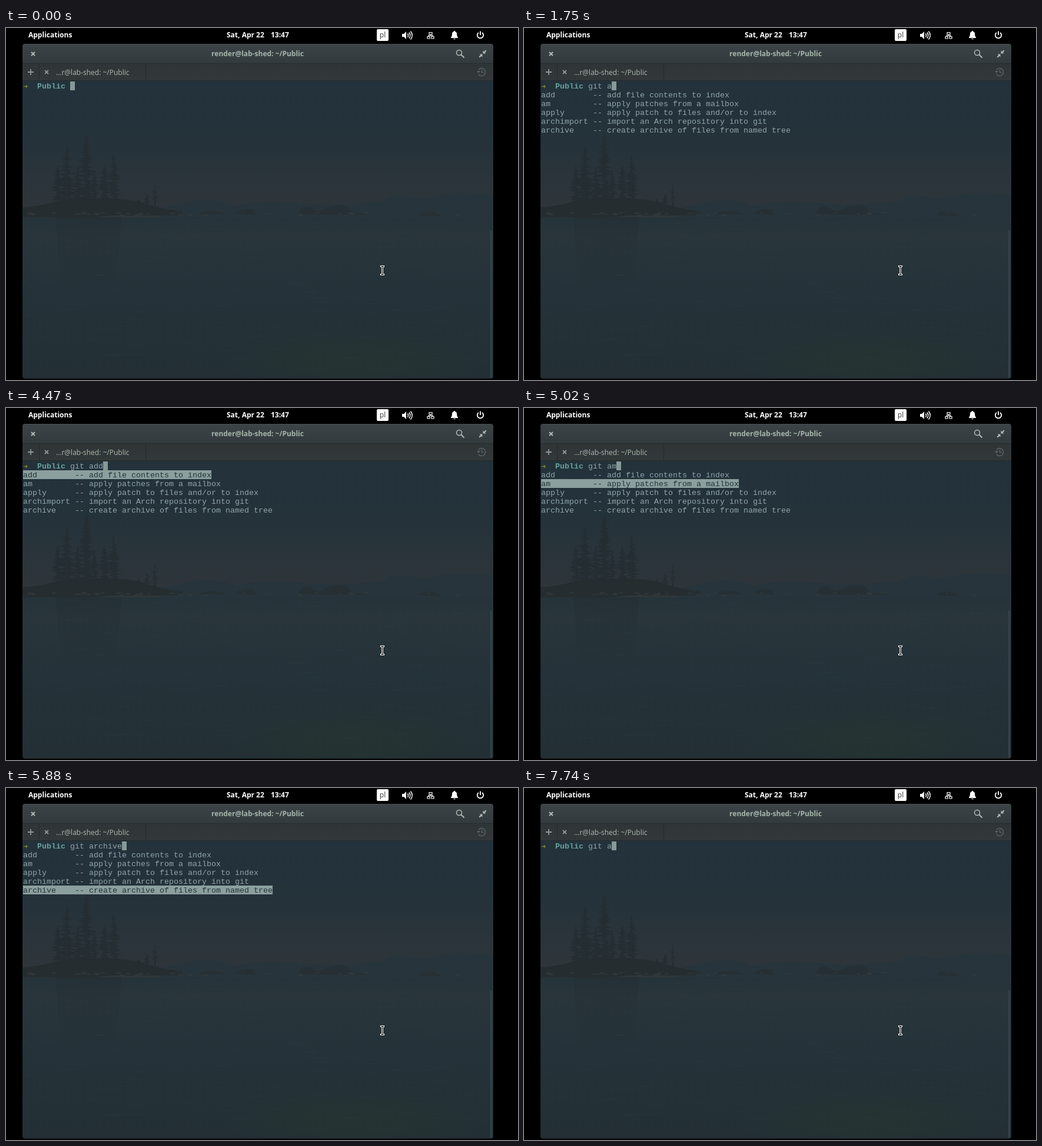
Write an HTML page that moves like this. It is 870 px wide and 599 px high and loops after 8 s.

```html
<!DOCTYPE html>
<html lang="en">
<head>
<meta charset="utf-8">
<title>Terminal completion</title>
<style>
  html, body { margin: 0; width: 100%; height: 100%; overflow: hidden; background: #000; }
  svg { position: absolute; left: 0; top: 0; }
  svg text { font: 12px "Open Sans", "Noto Sans", sans-serif; }
  svg .bold { font-weight: 700; }
  #term { position: absolute; left: 29px; top: 91px; color: #8fa5a9;
    font: 13.333px/17px "Liberation Mono", monospace; white-space: pre; }
  #term div { height: 15px; width: max-content; }
  #prompt { display: flex; }
  #arrow { width: 24px; color: #85862f; font-family: "DejaVu Sans Mono", monospace; }
  #dir { color: #68a29c; font-weight: 700; }
  #cursor { width: 8px; background: #869a98; }
  #term .selected { background: #8b9f9e; color: #24333a; }
</style>
</head>
<body>
<svg width="870" height="599" viewBox="0 0 870 599">
  <defs>
    <linearGradient id="header" x2="0" y2="1">
      <stop stop-color="#3d4448"/><stop offset="1" stop-color="#333a3d"/>
    </linearGradient>
    <linearGradient id="tabs" x2="0" y2="1">
      <stop stop-color="#2f3537"/><stop offset="1" stop-color="#333839"/>
    </linearGradient>
    <linearGradient id="sky" x2="0" y2="1">
      <stop stop-color="#23323b"/><stop offset=".4" stop-color="#24323a"/>
      <stop offset=".7" stop-color="#2a343a"/><stop offset="1" stop-color="#2f363a"/>
    </linearGradient>
    <linearGradient id="water" x2="0" y2="1">
      <stop stop-color="#26333a"/><stop offset=".12" stop-color="#29353b"/>
      <stop offset=".5" stop-color="#243239"/><stop offset="1" stop-color="#232f34"/>
    </linearGradient>
    <radialGradient id="moss">
      <stop stop-color="#26372f" stop-opacity=".6"/><stop offset="1" stop-color="#26372f" stop-opacity="0"/>
    </radialGradient>
    <linearGradient id="shade" x2="0" y2="1">
      <stop stop-color="#212c31" stop-opacity=".4"/><stop offset="1" stop-color="#212c31" stop-opacity="0"/>
    </linearGradient>
    <clipPath id="screen"><path d="M28 90H828V593Q828 596 825 596H31Q28 596 28 593z"/></clipPath>
  </defs>

  <g clip-path="url(#screen)">
    <path fill="url(#sky)" d="M28 90H828V322H28z"/>
    <path fill="#27343c" d="M260 308Q300 296 330 293T390 302Q420 295 460 296T530 300Q600 300 640 294Q655 283 672 285T710 290Q740 281 775 281T828 285V324H260z"/>
    <path fill="url(#water)" d="M28 322H828V597H28z"/>
    <path fill="url(#shade)" d="M84 322H196L186 450H94z"/>
    <ellipse cx="590" cy="565" rx="230" ry="60" fill="url(#moss)"/>
    <g id="ripples" stroke="#30404a" stroke-opacity=".25"/>
    <path fill="#252d31" d="M28 305Q60 303 85 295T150 290Q210 289 235 298T300 312V319H180L150 322H28z"/>
    <path fill="#262f33" d="M390 316Q400 306 420 309L425 318zM497 317Q500 300 518 305Q530 316 535 311Q550 302 570 301Q587 304 587 318zM590 318Q602 312 615 317zM700 319Q710 307 735 316L738 320zM280 318Q290 304 301 317zM325 317Q345 306 375 317z"/>
    <g id="stones" fill="#32393b"/>
    <g id="trees" fill="#242d31"/>
    <path fill="#34434a" d="M823 345H826V595H823z"/>
  </g>

  <path fill="url(#header)" d="M28 61V31Q28 27 32 27H824Q828 27 828 31V61z"/>
  <path stroke="#485054" d="M31 27.5H825"/>
  <path fill="url(#tabs)" d="M28 61H828V90H28z"/>
  <path stroke="#252b2d" fill="none" d="M28 60.5H828M56.5 61V90M237.5 61V90M28 89.5H828"/>
  <path stroke="#1a2226" d="M31 596.5H825"/>

  <g fill="#fff">
    <text class="bold" x="38" y="16">Applications</text>
    <text class="bold" x="375" y="16">Sat, Apr 22</text>
    <text class="bold" x="450" y="16">13:47</text>
  </g>
  <text class="bold" x="427.5" y="48" text-anchor="middle" fill="#a5b5aa">render@lab-shed: ~/Public</text>
  <text x="85" y="80" fill="#adb9ae">…r@lab-shed: ~/Public</text>

  <rect x="630" y="2" width="20" height="20" rx="2" fill="#fff"/>
  <text x="640" y="16" text-anchor="middle" fill="#333">pl</text>
  <g fill="none" stroke="#fff" stroke-width="1.5">
    <path fill="#fff" stroke="none" d="M673 10H676L680 6V19L676 15H673z"/>
    <path d="M682.5 9.5Q684.5 12.5 682.5 15.5M685 7.5Q688.5 12.5 685 17.5M687.5 5.5Q693 12.5 687.5 19.5"/>
    <path stroke-width="1.2" d="M719 7.5H724V11H719zM716 14.5H720V18H716zM723 14.5H727V18H723zM721.5 11V13M718 14.5V12.8H725V14.5"/>
    <path fill="#fff" stroke="none" d="M756 17V16Q758 14 758 10Q758 6.5 761 6V5H763V6Q766 6.5 766 10Q766 14 768 16V17zM760 18H764Q762 20.5 760 18z"/>
    <path stroke-width="1.8" d="M803 8A5.2 5.2 0 1 0 809 8M806 5.5V12"/>
  </g>
  <g fill="none" stroke="#b0bbb5" stroke-width="1.5">
    <path stroke-width="2" d="M43 41L49 47M49 41L43 47"/>
    <circle cx="770" cy="42" r="4.5"/><path stroke-width="2" d="M773.5 45.5L778.5 50.5"/>
    <path fill="#b0bbb5" stroke="none" d="M810.5 43.5V38.5L812.3 40.3L815 37.5L816.5 39L813.7 41.7L815.5 43.5zM809.5 44.5V49.5L807.7 47.7L805 50.5L803.5 49L806.3 46.3L804.5 44.5z"/>
    <path stroke="#8d9993" stroke-width="1.8" d="M37 75H47M42 70V80M66 72L72 78M72 72L66 78"/>
    <path stroke="#596164" d="M803 71A6.5 6.5 0 1 1 803 79M808.5 71V75.5H812"/>
    <path fill="#596164" stroke="none" d="M800 73H806L803 77z"/>
  </g>

  <path stroke="#fff" stroke-width="3" d="M636 405.5H643M639.5 405V420M636 419.5H643"/>
  <path stroke="#000" d="M637 405.5H642M639.5 405V420M637 419.5H642"/>
</svg>

<div id="term"><div id="prompt"><span id="arrow">➜</span><span id="dir">Public </span><span id="command"></span><span id="cursor"></span></div></div>

<script>
const $ = id => document.getElementById(id);

let seed = 7;
const random = () => (seed = seed * 16807 % 2147483647) / 2147483647;
const between = (a, b) => a + random() * (b - a);
const addPath = (parent, d) => {
  const path = document.createElementNS('http://www.w3.org/2000/svg', 'path');
  path.setAttribute('d', d);
  parent.append(path);
};

// A conifer: ragged, loose branches that soon reach their full width.
function tree(x, top, base, half) {
  let d = `M${x - 1.5} ${base}L${x} ${top}L${x + 1.5} ${base}z`;
  for (let y = top + 3; y < base - 8; y += 2.5) {
    const reach = half * Math.min(1, .15 + (y - top) / (base - top) * 1.6);
    for (const side of [-1, 1]) {
      d += `M${x} ${y - 2}L${x + side * reach * between(.2, 1)} ${y + between(-1, 4)}L${x} ${y + 2}z`;
    }
  }
  addPath($('trees'), d);
}
[[137, 179, 298, 20], [104, 202, 300, 21], [88, 232, 300, 13], [183, 216, 298, 16],
 [167, 232, 297, 14], [122, 235, 298, 12], [150, 240, 297, 10], [253, 264, 304, 6],
 [240, 282, 304, 8], [226, 289, 304, 6]].forEach(t => tree(...t));

for (let i = 0; i < 46; i++) {
  const x = i < 24 ? between(35, 260) : between(265, 780), w = between(4, 13);
  addPath($('stones'), `M${x} ${between(315, 320)}q${w / 2} -4 ${w} 0z`);
}
for (let i = 0; i < 230; i++) {
  addPath($('ripples'), `M${between(28, 800)} ${328 + 240 * random() ** 1.3}h${between(8, 40)}`);
}

const rows = [
  ['add', 'add file contents to index'],
  ['am', 'apply patches from a mailbox'],
  ['apply', 'apply patch to files and/or to index'],
  ['archimport', 'import an Arch repository into git'],
  ['archive', 'create archive of files from named tree'],
].map(([name, about]) => {
  const row = document.createElement('div');
  row.textContent = `${name.padEnd(10)} -- ${about}`;
  $('term').append(row);
  return { name, row };
});

const LOOP = 8000;
const typed = [[0, ''], [210, 'g'], [430, 'gi'], [650, 'git'], [1200, 'git '], [1420, 'git a'],
  [7510, 'git am'], [7740, 'git a']];
const picks = [[0, -1], [4470, 0], [5020, 1], [5350, 2], [5550, 3], [5880, 4],
  [6310, 3], [6530, 2], [6760, 1], [7510, -1]];
const cursorOff = [[100, 210], [2280, 2830], [3590, 3810], [6760, 7290]];
const valueAt = (steps, t) => steps.findLast(([start]) => t >= start)[1];
const within = (t, [start, end]) => t >= start && t < end;

function draw() {
  const t = performance.now() % LOOP;
  const pick = valueAt(picks, t);
  const listed = within(t, [1750, 7510]);
  $('command').textContent = pick < 0 ? valueAt(typed, t) : 'git ' + rows[pick].name;
  $('cursor').style.visibility = cursorOff.some(span => within(t, span)) ? 'hidden' : '';
  rows.forEach(({ row }, i) => {
    row.style.visibility = listed ? '' : 'hidden';
    row.className = i === pick ? 'selected' : '';
  });
  requestAnimationFrame(draw);
}
draw();
</script>
</body>
</html>
```
